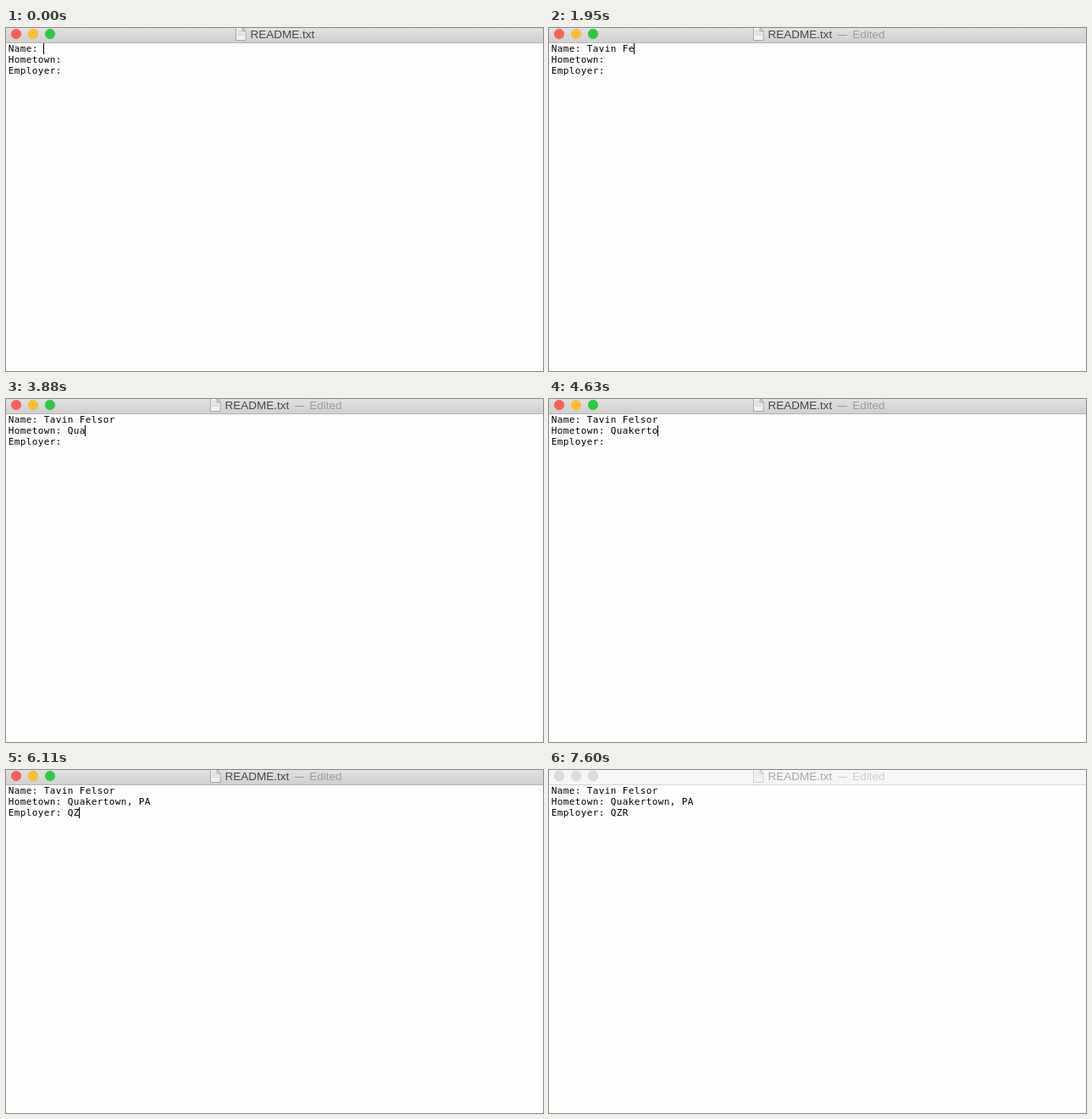
Recreate the animation shown at these times as an HTML page with a canvas. Size 634 by 405 pixels, loop 7630 ms.

```html
<!DOCTYPE html>
<html lang="en">
<head>
<meta charset="utf-8">
<title>README.txt</title>
<style>
  html, body { margin: 0; width: 100%; height: 100%; overflow: hidden; background: #fdfdfd; }
  canvas { display: block; }
</style>
</head>
<body>
<canvas id="stage" width="634" height="405"></canvas>
<script>
const ctx = document.getElementById('stage').getContext('2d');
const LOOP = 7630, TICK = 149;
const EDIT_TICK = 9, BLUR_TICK = 51;
const LEFT = 2, TOP = 18, CELL = 7, LINE = 13;
const LABELS = ['Name: ', 'Hometown: ', 'Employer: '];
const ANSWERS = ['Tavin Felsor', 'Quakertown, PA', 'QZR'];

// Bursts of typing, in ticks; each ends with that many letters on its line.
const BURSTS = [
  { line: 0, from: -4, to: -3, letters: 0 },
  { line: 0, from: 8, to: 15, letters: 12 },
  { line: 1, from: 15, to: 16, letters: 0 },
  { line: 1, from: 23, to: 26, letters: 3 },
  { line: 1, from: 27, to: 35, letters: 14 },
  { line: 2, from: 36, to: 37, letters: 0 },
  { line: 2, from: 39, to: 41.4, letters: 3 }
];
const BLINK_ON = 4, BLINK_PERIOD = 7.5;

function typingAt(tick) {
  const index = BURSTS.findLastIndex(burst => burst.from < tick);
  const { line, from, to, letters } = BURSTS[index];
  const before = BURSTS[index - 1];
  const first = before && before.line === line ? before.letters : 0;
  const progress = Math.min(1, (tick - from) / (to - from));
  const idle = Math.max(0, tick - to);
  return {
    line,
    typed: Math.floor(first + (letters - first) * progress),
    caret: tick < BLUR_TICK && idle % BLINK_PERIOD < BLINK_ON
  };
}

function rect(x, y, w, h, color) {
  ctx.fillStyle = color;
  ctx.fillRect(x, y, w, h);
}

function label(text, x, color) {
  ctx.font = '13.5px "Liberation Sans", Arial, sans-serif';
  ctx.fillStyle = color;
  ctx.fillText(text, x, 12);
}

function button(x, fill, edge) {
  ctx.beginPath();
  ctx.arc(x, 7, 5.7, 0, Math.PI * 2);
  ctx.fillStyle = fill;
  ctx.fill();
  ctx.strokeStyle = edge;
  ctx.lineWidth = 0.6;
  ctx.stroke();
}

function polygon(points, fill) {
  ctx.beginPath();
  points.forEach(([x, y]) => ctx.lineTo(x, y));
  ctx.closePath();
  ctx.fillStyle = fill;
  ctx.fill();
  ctx.stroke();
}

function pageIcon(x, active) {
  ctx.save();
  ctx.translate(x, 0);
  ctx.globalAlpha = active ? 1 : 0.5;
  ctx.strokeStyle = '#999';
  ctx.lineWidth = 0.8;
  polygon([[0.5, -1], [8, -1], [12, 4], [12, 14.5], [0.5, 14.5]], '#f3f3f3');
  polygon([[8, -1], [8, 4], [12, 4]], '#ddd');
  for (let y = 2; y < 9; y += 2) rect(2, y, y < 4 ? 5 : 8, 1, '#d2d2d2');
  ctx.restore();
}

function drawTitleBar(tick) {
  const active = tick < BLUR_TICK;
  const shade = ctx.createLinearGradient(0, 0, 0, 17);
  shade.addColorStop(0, active ? '#e1e1e1' : '#f6f6f6');
  shade.addColorStop(1, active ? '#d0d0d0' : '#f6f6f6');
  rect(0, 0, 634, 17, shade);
  rect(0, 17, 634, 1, active ? '#b4b4b4' : '#d6d6d6');

  const lights = active
    ? [['#fc6058', '#ec5048'], ['#fec02f', '#eab02a'], ['#2aca42', '#22b938']]
    : Array(3).fill(['#dcdcdc', '#cccccc']);
  lights.forEach(([fill, edge], i) => button(12 + 20 * i, fill, edge));

  // The title slides left to make room for the edit mark.
  const edited = tick >= EDIT_TICK;
  const slide = !edited ? 1 : tick === EDIT_TICK ? 0.37 : 0;
  const x = 241 + 30 * slide;
  pageIcon(x, active);
  label('README.txt', x + 17.6, active ? '#484848' : '#a9a9a9');
  if (!edited) return;
  const faint = active ? '#9c9c9c' : '#cecece';
  rect(341 + 10 * slide, 8, 11 - 10 * slide, 1, faint);
  label(slide ? 'Edit' : 'Edited', 358.3 + 10 * slide, faint);
}

function drawText({ line, typed, caret }) {
  ctx.font = '11px "DejaVu Sans Mono", monospace';
  ctx.fillStyle = '#000';
  LABELS.forEach((name, row) => {
    const count = row < line ? ANSWERS[row].length : row === line ? typed : 0;
    const text = name + ANSWERS[row].slice(0, count);
    [...text].forEach((ch, i) => ctx.fillText(ch, LEFT + 0.8 + CELL * i, TOP + LINE * row + 10));
  });
  if (caret) {
    const column = LABELS[line].length + typed;
    rect(LEFT + CELL * column, TOP + LINE * line, 1, LINE, '#000');
  }
}

function draw(time) {
  const tick = Math.floor((time % LOOP) / TICK);
  rect(0, 0, 634, 405, '#fdfdfd');
  drawTitleBar(tick);
  drawText(typingAt(tick));
}

const start = performance.now();
function animate() {
  draw(performance.now() - start);
  requestAnimationFrame(animate);
}
animate();
</script>
</body>
</html>
```
